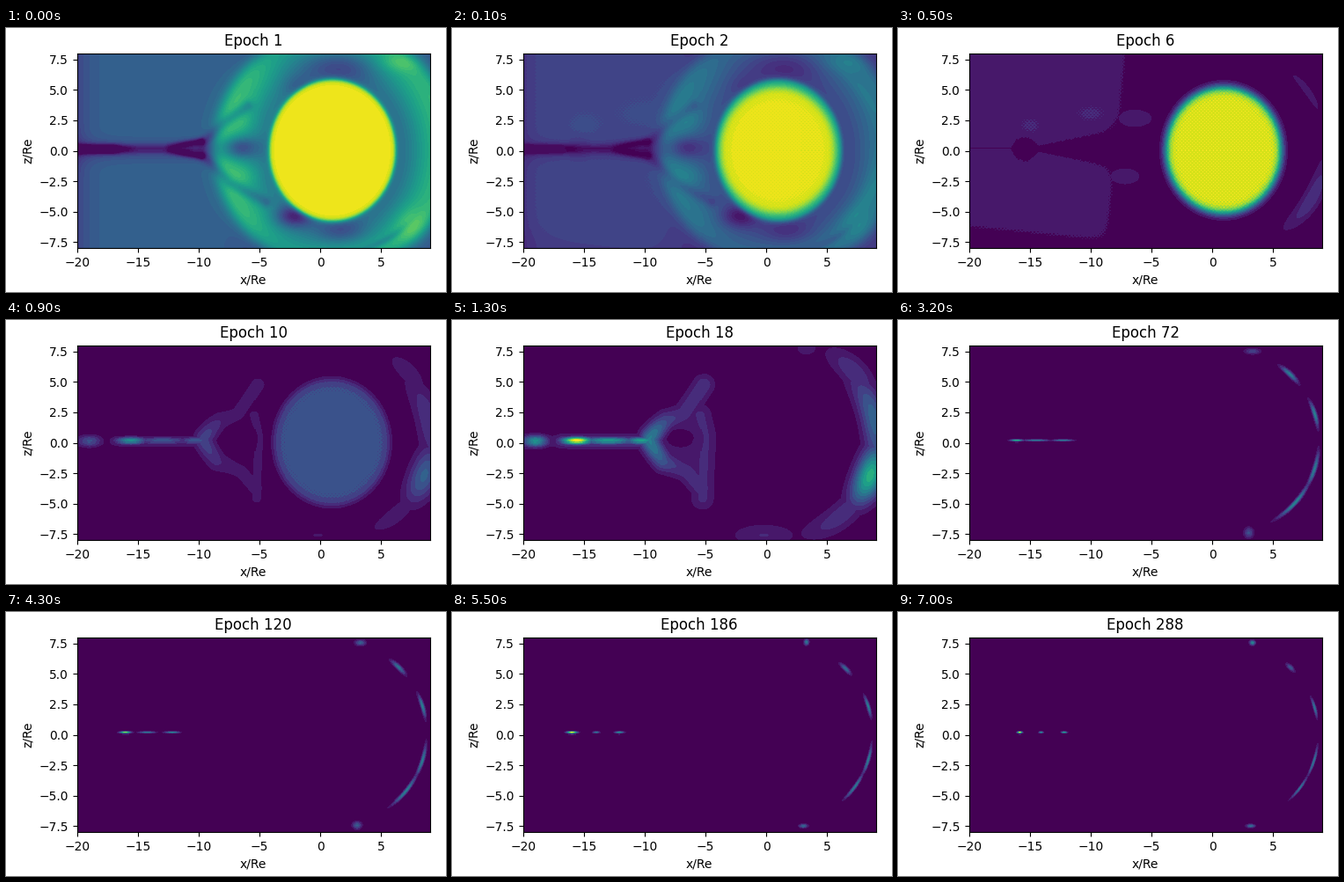
Write a matplotlib script that moves like this. It is 500 px wide and 300 px high and loops after 7.1 s.

```python
import numpy as np
import matplotlib.pyplot as plt
from matplotlib.animation import FuncAnimation

W, H, DPI = 500, 300, 100
FRAMES, INTERVAL = 71, 100
X0, X1, Z0, Z1 = -20, 9, -8, 8
NX, NZ = 401, 221
KEYS = [13, 20, 32, 55, 70]

xs = X0 + (np.arange(NX) + 0.5) * (X1 - X0) / NX
zs = Z0 + (np.arange(NZ) + 0.5) * (Z1 - Z0) / NZ
X, Z = np.meshgrid(xs, zs)

# polar coordinates around the centre of the bow-shaped front
FRONT_R = np.hypot(X - 1.15, Z - 0.1)
FRONT_A = np.degrees(np.arctan2(Z - 0.1, X - 1.15))
RIPPLE = np.cos(2 * np.pi * X / 0.29) * np.cos(2 * np.pi * Z / 0.29)

UPPER = [(-9.6, 0.3), (-8, 1.7), (-6.8, 2.3), (-5.2, 4.7)]
LOWER = [(-9.6, 0.1), (-8.3, -1.5), (-6.5, -2.4), (-5.4, -3.7)]
BRIDGE = [(-5.5, 2.2), (-5.1, 0.5), (-5.3, -3.5), (-5.3, -4.6)]


def sigmoid(v):
    return 1 / (1 + np.exp(-np.clip(v, -50, 50)))


def blob(x, z, sx, sz, amp=1.0):
    return amp * np.exp(-((X - x) / sx) ** 2 - ((Z - z) / sz) ** 2)


def arc(radius, angle, spread, width, amp):
    u = (FRONT_A - angle) / spread
    v = (FRONT_R - radius) / width
    return amp * np.exp(-u ** 2 - v ** 2)


def path_glow(points, width):
    """Soft band around a polyline."""
    best = np.full(X.shape, np.inf)
    for (ax_, az), (bx, bz) in zip(points, points[1:]):
        dx, dz = bx - ax_, bz - az
        t = np.clip(((X - ax_) * dx + (Z - az) * dz) / (dx * dx + dz * dz), 0, 1)
        best = np.minimum(best, np.hypot(X - ax_ - t * dx, Z - az - t * dz))
    return np.exp(-(best / width) ** 2)


def disc(x, a, b, soft):
    rho = np.hypot((X - x) / a, Z / b)
    return sigmoid((1 - rho) / soft)


def early_field():
    """Bright lobes, dark tail and the sharp disc."""
    rho = np.hypot((X - 0.9) / 5.2, Z / 5.85)
    v = 0.74 - 0.33 * np.exp(-((rho - 1) / 0.45) ** 2)
    v -= 0.05 * sigmoid((X - 2) / 1.2) + 0.12 * np.exp(-(X + 20))

    tail = np.interp(X, [-20, -17, -16.3, -15, -12, -10, -9.3],
                     [0.4, 0.45, 0.25, 0.15, 0.15, 0.1, 0])
    v -= tail * np.exp(-((Z - 0.1) / 0.35) ** 2)
    v -= 0.08 * sigmoid((-8 - X) * 2) * np.exp(-(Z / 0.9) ** 2)
    split = np.maximum(path_glow([(-12.5, 0.3), (-9.8, 0.7)], 0.28),
                       path_glow([(-12.5, -0.05), (-9.8, -0.45)], 0.28))
    v -= 0.28 * split * sigmoid((X + 12) * 2)
    v -= 0.15 * path_glow([(-9.6, 0.6), (-8, 2.2), (-6, 3.6)], 0.45)
    v -= 0.15 * path_glow([(-9.6, -0.4), (-7.5, -2.6), (-4.6, -4.2)], 0.45)
    v -= blob(-6.7, 0.2, 1.4, 0.9, 0.35)
    v += blob(-6.2, 2.3, 0.9, 0.8, 0.04) + blob(-6, -2, 1.1, 0.8, 0.06)

    v -= blob(1.5, 7, 3, 1.5, 0.2) + blob(-2.3, -5.4, 1.5, 0.9, 0.3)
    v -= blob(1.6, -6.6, 2, 1, 0.16) + blob(-1.8, 5.2, 1.3, 0.9, 0.08)
    v -= blob(-3, 8, 3, 2.5, 0.1) + blob(-3.5, -8, 3.5, 2.2, 0.1)
    v += blob(7.4, -6.2, 1.4, 1.5, 0.12) + blob(6.5, 7.2, 1.8, 0.8, 0.1)
    v -= 0.42 * sigmoid((FRONT_R - 9.9) / 0.3)
    v -= arc(8.5, -62, 18, 0.3, 0.12)

    cap = disc(0.9, 5.2, 5.8, 0.02)
    return np.clip(v, 0.03, 1) * (1 - cap) + 0.96 * cap


def lobe_field():
    """Faint lobes left behind once the background has dropped."""
    gap = np.interp(X, [-16.6, -16.1, -15.3, -14.7, -14.3, -9, -8],
                    [0.02, 0.7, 0.95, 0.6, 0.2, 1.2, 1.6])
    v = 0.085 * sigmoid((-7.6 - X + 0.1 * Z) * 2)
    v *= 1 - np.exp(-((Z - 0.13) / gap) ** 2)
    v *= sigmoid((Z + 7.6 + 0.1 * (X + 10)) * 2)
    rough = 0.045 + 0.02 * RIPPLE
    v += (blob(-10, 3, 1.3, 0.7) + blob(-15, 2, 0.9, 0.7)) * rough
    v += 0.006 * RIPPLE * (v > 0.04)
    for part in (blob(-6.4, 2.6, 2, 1.1, 0.09), blob(-7.2, -2.1, 1.8, 1.0, 0.09),
                 arc(8.0, -30, 24, 0.75, 0.17), arc(8.1, 36, 20, 0.45, 0.085)):
        v = np.maximum(v, part)
    return v


def wedge_field():
    """Faint tail envelope and its forked end with a dark hole inside."""
    root = np.exp(-((X + 9.6) / 1.3) ** 2)
    fork = np.maximum(path_glow(UPPER, 0.9), path_glow(LOWER, 0.9))
    v = fork * (0.16 + 0.26 * root)
    v = np.maximum(v, 0.13 * path_glow(BRIDGE, 1.0))
    v = np.maximum(v, blob(-6.8, 0, 2.3, 2.6, 0.12))
    v = v * (1 - blob(-7, 0.3, 1.1, 0.8))
    envelope = 0.2 * path_glow([(-20, 0.1), (-9.8, 0.1)], 0.55)
    pinch = 1 - 0.5 * np.exp(-((X + 17.6) / 0.6) ** 2)
    return np.maximum(v, envelope * pinch)


EARLY, LOBES, WEDGE = early_field(), lobe_field(), wedge_field()
BIG_DISC = disc(0.83, 4.75, 5.17, 0.042) * (0.925 + 0.035 * RIPPLE)


def late_field(frame):
    """Tail sheet, front arcs and end spots, all narrowing with time."""
    def k(*values):
        return np.interp(frame, KEYS, values)

    thick = k(0.27, 0.18, 0.085, 0.09, 0.08)
    radius = k(7.8, 7.75, 7.5, 7.45, 7.45)
    parts = [
        # tail sheet
        blob(k(-15.6, -15.3, -16.1, -16, -15.85), 0.13,
             k(1.2, 1.2, 0.5, 0.4, 0.2), thick, k(1, 0.9, 0.65, 1, 1)),
        blob(k(-13, -13.6, -14.5, -14, -14.1), 0.13,
             k(2.2, 1.2, 1, 0.28, 0.18), thick, k(0.55, 0.8, 0.42, 0.4, 0.5)),
        blob(k(-10.3, -12, -12.3, -12.1, -12.2), 0.13,
             k(1.3, 1, 0.8, 0.37, 0.23), thick, k(0.57, 0.75, 0.42, 0.5, 0.6)),
        blob(-19, 0.1, k(1, 1, 0.5, 0.5, 0.5), k(0.45, 0.2, 0.1, 0.1, 0.1),
             k(0.5, 0.1, 0, 0, 0)),
        # front arcs, top to bottom
        arc(radius + k(0.4, 0, 0, 0, 0), k(43, 45, 47, 45, 46),
            k(20, 11, 7, 4.5, 3.5), k(1.1, 0.42, 0.2, 0.18, 0.18),
            k(0.17, 0.2, 0.42, 0.35, 0.28)),
        arc(radius, k(13, 17, 17, 17, 16), k(28, 14, 8, 6.5, 6),
            k(1.1, 0.4, 0.17, 0.14, 0.12), k(0.33, 0.3, 0.43, 0.43, 0.4)),
        arc(radius, k(-21, -18, -18, -17, -18), k(18, 14, 11, 9, 9),
            k(1.2, 0.45, 0.17, 0.13, 0.11), k(0.62, 0.45, 0.42, 0.42, 0.4)),
        arc(radius, k(-50, -40, -42, -36, -37), k(28, 18, 14, 9, 8),
            k(1.1, 0.5, 0.17, 0.13, 0.11), k(0.16, 0.34, 0.45, 0.42, 0.38)),
        # spots near the upper and lower edges
        blob(3.2, k(7.7, 7.6, 7.45, 7.55, 7.5), k(1, 0.8, 0.65, 0.2, 0.23),
             k(0.7, 0.5, 0.25, 0.25, 0.2), k(0.1, 0.15, 0.22, 0.4, 0.48)),
        blob(k(-0.3, 3.8, 2.9, 2.95, 3.05), k(-7.6, -7.4, -7.4, -7.5, -7.5),
             k(2.8, 1.1, 0.4, 0.35, 0.35), k(1, 0.6, 0.45, 0.17, 0.15),
             k(0.12, 0.13, 0.25, 0.35, 0.38)),
    ]
    v = np.maximum.reduce(parts)
    fade = np.interp(frame, [13, 18], [1, 0])
    return np.maximum(v, WEDGE * fade)


def field(frame):
    v = late_field(frame) * np.interp(frame, [5, 13], [0, 1])
    if frame < 13:
        v = np.maximum(v, LOBES * np.interp(frame, [5, 11], [1, 0]))
        v = np.maximum(v, BIG_DISC * np.interp(frame, [5, 7, 10], [1, 0.8, 0]))
    if frame < 5:
        w = np.interp(frame, [0, 1, 2, 3, 5], [1, 0.6, 0.33, 0.16, 0])
        v = w * EARLY + (1 - w) * v
    levels = int(round(np.interp(frame, [0, 5], [40, 17])))
    band = np.clip(np.floor(v * levels), 0, levels - 1)
    return band / (levels - 1)


def epoch(frame):
    """The step between shown epochs grows by one every ten frames."""
    d, r = divmod(frame, 10)
    return 5 * d * (d + 1) + (d + 1) * (r + 1)


fig = plt.figure(figsize=(W / DPI, H / DPI), dpi=DPI, facecolor="white")
ax = fig.add_axes([80.6 / W, 49.7 / H, 401.2 / W, 221.5 / H])
image = ax.imshow(field(0), extent=(X0, X1, Z0, Z1), origin="lower",
                  aspect="auto", interpolation="nearest",
                  cmap="viridis", vmin=0, vmax=1)
ax.set_xticks(np.arange(-20, 6, 5))
ax.set_yticks(np.arange(-7.5, 8, 2.5))
ax.set_xlabel("x/Re")
ax.set_ylabel("z/Re")
title = ax.set_title("Epoch 1")


def update(frame):
    image.set_data(field(frame))
    title.set_text(f"Epoch {epoch(frame)}")
    return image, title


anim = FuncAnimation(fig, update, frames=FRAMES, interval=INTERVAL,
                     repeat=True, repeat_delay=0, blit=False)
plt.show()
```
